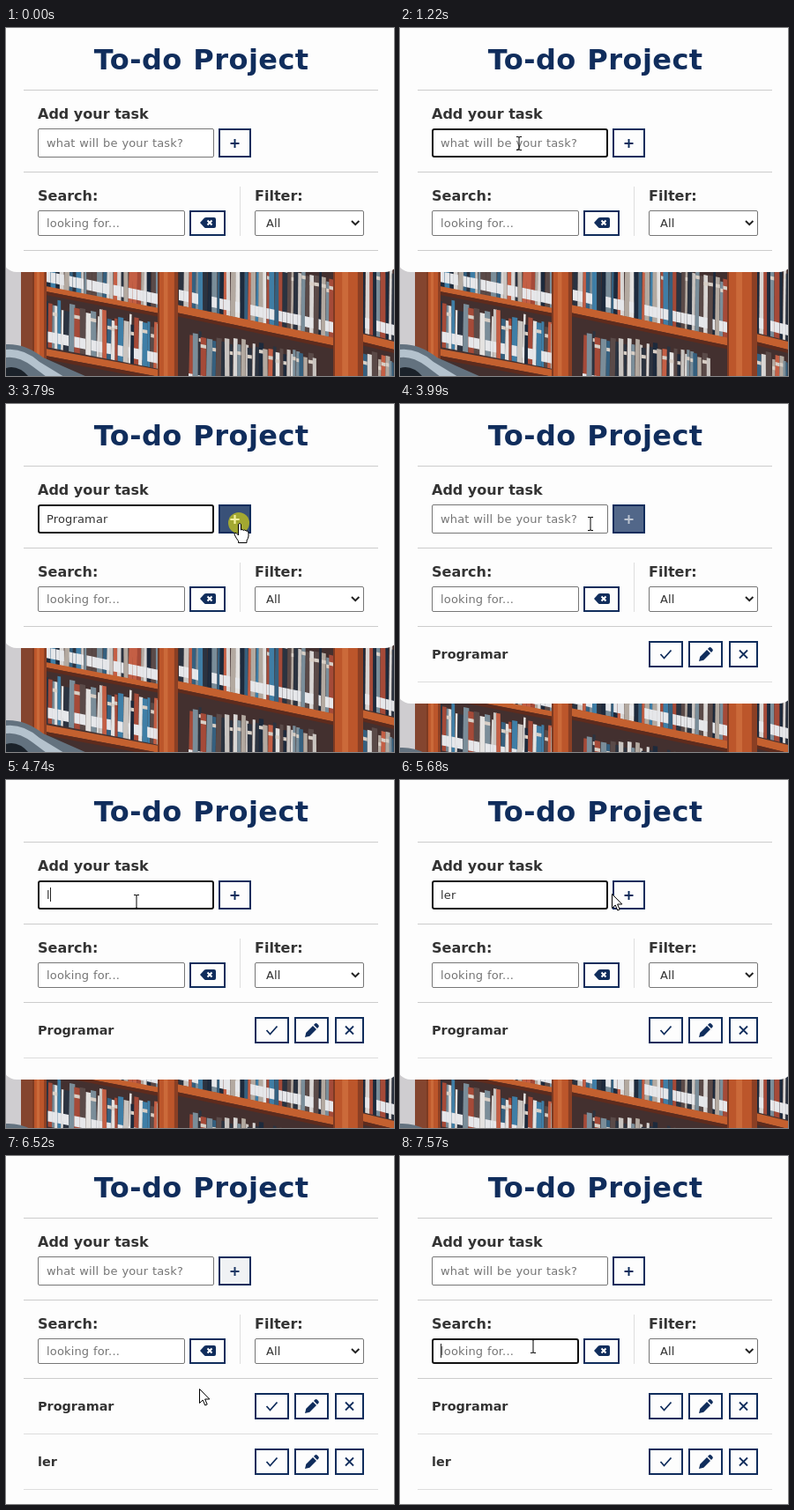
These frames come from a looping animation (440 px wide and 395 px high, 8000 ms). An HTML page:

```html
<!DOCTYPE html>
<html lang="en">
<head>
<meta charset="utf-8">
<title>To-do Project</title>
<style>
html, body { margin: 0; width: 100%; height: 100%; overflow: hidden; background: #fdfdfd; }
svg { display: block; width: 440px; height: 395px; }
text { font-family: Verdana, "DejaVu Sans", sans-serif; font-size: 13px; fill: #333; letter-spacing: .012em; word-spacing: .034em; white-space: pre; }
.title { font-size: 32px; font-weight: bold; fill: #102d5c; text-anchor: middle; letter-spacing: .0135em; }
.label { font-size: 16px; font-weight: bold; letter-spacing: 0; word-spacing: 0; }
.task { font-size: 14.4px; font-weight: bold; letter-spacing: 0; }
.hint { fill: #757575; }
.line { stroke: #ccc; }
.field { fill: #fff; stroke: #767676; }
.focus { stroke: #101010; stroke-width: 2; }
.btn { fill: #fdfdfd; stroke: #102d5c; stroke-width: 2; }
.icon { fill: none; stroke: #102d5c; stroke-width: 2; }
.solid { fill: #102d5c; }
.photo { filter: blur(.5px); }
</style>
</head>
<body>
<svg id="stage" viewBox="0 0 440 395"></svg>
<script>
const LOOP = 8000;
const NAVY = [16, 45, 92], PAPER = [253, 253, 253];
const PLUS = 'M254.5 131H264.5M259.5 126V136';
const stage = document.getElementById('stage');

function add(parent, tag, attrs = {}, text) {
  const el = document.createElementNS('http://www.w3.org/2000/svg', tag);
  for (const k in attrs) el.setAttribute(k, attrs[k]);
  if (text) el.textContent = text;
  parent.append(el);
  return el;
}
const group = (parent, cls = '') => add(parent, 'g', { class: cls });
const poly = (parent, points, fill) => add(parent, 'polygon', { points: points.join(' '), fill });
const path = (parent, d, cls) => add(parent, 'path', { d, class: cls });
const blob = (parent, d, fill) => add(parent, 'path', { d, fill });
const label = (parent, x, y, cls, text) => add(parent, 'text', { x, y, class: cls }, text);
const box = (parent, x, y, w, h, cls, rx = 0) =>
  add(parent, 'rect', { x, y, width: w, height: h, class: cls, rx });
const show = (el, on) => el.setAttribute('display', on ? 'inline' : 'none');

// Bookshelf backdrop
let seed = 11;
const rand = () => (seed = (seed * 16807) % 2147483647) / 2147483647;
const SPINES = ['#2b3340', '#d9d6d4', '#3f7ea6', '#a54a38', '#c9c4c0', '#1d2a3c',
  '#e4e2e0', '#35607f', '#b3a9a0', '#7a8d99', '#5a4a48', '#c45f45'];

// Slanted strip between two x positions, `h` tall
const strip = (g, x0, y0, x1, y1, h, fill) =>
  poly(g, [x0, y0, x1, y1, x1, y1 + h, x0, y0 + h], fill);

function books(g, x0, y0, x1, y1, height, vary) {
  strip(g, x0, y0 - height - 12, x1, y1 - height - 12, height + 12, '#43302f');
  const slope = (y1 - y0) / (x1 - x0);
  for (let x = x0; x < x1;) {
    const w = Math.min(2.5 + rand() * 4, x1 - x), lean = 1.5 - rand() * 2;
    const top = height - rand() * vary;
    const a = y0 + slope * (x - x0), b = a + slope * w;
    const color = SPINES[Math.floor(rand() * SPINES.length)];
    poly(g, [x + lean, a - top, x + w + lean, b - top, x + w, b, x, a], color);
    if (rand() < .75) strip(g, x, a - 18, x + w, b - 18, 12, '#e6e7ea');
    if (rand() < .4) strip(g, x + lean, a - top + 8, x + w + lean, b - top + 8, 4, '#d8cfc6');
    x += w;
  }
}
function plank(g, x0, y0, x1, y1, h) {
  strip(g, x0, y0, x1, y1, h, '#c4602f');
  strip(g, x0, y0 + h, x1, y1 + h, 4, '#5e2b1d');
}
function post(g, x, w) {
  const bar = (left, right, fill) => strip(g, x + left, 200, x + right, 200, 230, fill);
  bar(0, w, '#bc562b');
  bar(0, 2, '#7d3a22');
  bar(w * .3, w * .5, '#cb6a3a');
  bar(w * .82, w, '#8a3f24');
}
function drawPhoto(g) {
  add(g, 'rect', { y: 200, width: 440, height: 230, fill: '#43302f' });
  strip(g, -5, 200, 17, 200, 230, '#cfcdd0');
  strip(g, 17, 200, 30, 200, 230, '#84452f');
  books(g, 45, 362, 174, 387, 56, 12);
  books(g, 45, 294, 174, 320, 60, 14);
  plank(g, 45, 293, 174, 318, 6);
  plank(g, 34, 362, 174, 388, 8);
  books(g, 207, 410, 352, 436, 68, 9);
  books(g, 196, 315, 372, 352, 76, 16);
  plank(g, 193, 314, 374, 352, 9);
  books(g, 404, 425, 440, 434, 62, 10);
  books(g, 404, 346, 440, 355, 88, 16);
  plank(g, 395, 345, 440, 356, 9);
  post(g, 30, 16);
  post(g, 172, 23);
  post(g, 371, 34);
  blob(g, 'M0 359Q22 358 42 374L92 396V430H0Z', '#63727f');
  blob(g, 'M0 365Q20 363 38 379L66 396H46L30 384Q14 372 0 374Z', '#b4c2cd');
  blob(g, 'M0 386Q14 382 26 396V430H0Z', '#1b222a');
}

const photo = group(stage, 'photo');
drawPhoto(photo);
const card = add(stage, 'rect', { x: -4, y: -30, width: 450, rx: 16, fill: '#fdfdfd' });

// Static interface
const rule = (parent, y) => path(parent, `M20 ${y}H422`, 'line');
label(stage, 221.7, 47, 'title', 'To-do Project');
[70.5, 163.5, 252.5].forEach(y => rule(stage, y));
label(stage, 36, 103, 'label', 'Add your task');
label(stage, 36, 196, 'label', 'Search:');
label(stage, 282, 196, 'label', 'Filter:');
path(stage, 'M265.5 180V236', 'line').style.stroke = '#ddd';

function makeField(x, y, w, h, hint, baseline) {
  const f = {};
  f.idle = box(stage, x + .5, y + .5, w - 1, h - 1, 'field', 1.5);
  f.ring = box(stage, x + 1, y + 1, w - 2, h - 2, 'field focus', 2);
  f.hint = label(stage, x + 10, baseline, 'hint', hint);
  f.text = label(stage, x + 10, baseline, '', '');
  f.caret = add(stage, 'rect', { y: baseline - 13, width: 1, height: 16, fill: '#222' });
  return f;
}
const taskField = makeField(36, 114, 200, 33, 'what will be your task?', 135);
const searchField = makeField(36, 207, 167, 29, 'looking for...', 226);

const plusBtn = box(stage, 242, 115, 35, 31, 'btn');
const plusIcon = path(stage, PLUS, 'icon');
box(stage, 209, 208, 39, 27, 'btn');
path(stage, 'M220 221L225 215.5Q226 215 227 215H236Q238 215 238 217V225Q238 227 236 227H227Q226 227 225 226.5Z', 'solid');
path(stage, 'M228.5 218.5l5 5m0-5l-5 5', 'icon').style.stroke = '#fff';

box(stage, 282.5, 207.5, 123, 28, 'field', 1.5);
label(stage, 295, 226, '', 'All');
path(stage, 'M392 219l4.2 4.2 4.2-4.2', 'icon').style.stroke = '#222';

function makeRow(y, name) {
  const g = group(stage);
  label(g, 36, y + 20, 'task', name);
  [[283, 37], [328, 37], [374, 31]].forEach(([x, w]) => box(g, x, y + 1, w, 28, 'btn'));
  path(g, `M295.5 ${y + 15}l4 4.5 8-9`, 'icon').style.strokeWidth = 1.8;
  path(g, `M339 ${y + 23}l1.3-5.3 7.7-7.7 4 4-7.7 7.7zM349 ${y + 9}l1.4-1.4q1.2-1 2.4 0l1.6 1.6q1 1.2 0 2.4l-1.4 1.4z`, 'solid');
  path(g, `M385 ${y + 10.5}l9 9m0-9l-9 9`, 'icon').style.strokeWidth = 1.8;
  rule(g, y + 46.5).style.stroke = '#ddd';
  return g;
}
const rows = [makeRow(269, 'Programar'), makeRow(332, 'ler')];

// Pointer
const halo = add(stage, 'circle', { r: 12, fill: '#dcd70a', opacity: .65 });
const plusOver = path(stage, PLUS, 'icon');
plusOver.style.stroke = '#f3f0a0';
const outline = { fill: '#fff', stroke: '#000', 'stroke-width': 1, 'stroke-linejoin': 'round' };
const pointers = {
  arrow: add(stage, 'path', { ...outline, d: 'M.5 .5V16.5L4.2 13 6.8 19 9.2 18 6.6 12H11.8Z' }),
  hand: add(stage, 'path', { ...outline, d: 'M-.5 1.5Q1-.5 2.5 1.5V8Q4 6.5 5.3 8.500Q7 7 8 9Q10.500 8 11 11V15Q10.500 18 9 20V22.500H-.5V20.500Q-3 17.500-5 13Q-5.500 10.500-3 11.500L-.5 14Z' }),
  beam: add(stage, 'path', { fill: 'none', stroke: '#000', d: 'M-3 -7.5H-1Q0 -7.5 0 -6.5Q0 -7.5 1 -7.5H3M0 -6.5V6.5M-3 7.5H-1Q0 7.5 0 6.5Q0 7.5 1 7.5H3' })
};

// Timeline: [time, x, y]
const ROUTE = [
  [70, 175, 308], [560, 135, 131], [3370, 135, 131], [3720, 264, 135], [3880, 264, 135],
  [4130, 148, 138], [5130, 148, 138], [5680, 240, 129], [5820, 264, 135], [6150, 264, 135],
  [6520, 219, 264], [6730, 206, 282], [7400, 151, 216], [LOOP, 151, 216]
];
const CLICKS = [[620, 690], [3720, 3860], [4200, 4270], [5960, 6030], [7430, 7570]];
const KEYS = [
  [1420, 'P'], [1820, 'Pr'], [1950, 'Pro'], [2080, 'Prog'], [2280, 'Progr'], [2350, 'Progra'],
  [2550, 'Program'], [2620, 'Programa'], [2820, 'Programar'], [3860, ''],
  [4740, 'l'], [4870, 'ler'], [6030, '']
];
const CARET_STARTS = [690, 4270, 7570];
const ADDED = [3860, 6030];
const BLINK = 530;

const within = (t, a, b) => t >= a && t < b;
const smooth = p => { p = Math.min(1, Math.max(0, p)); return p * p * (3 - 2 * p); };
const ramp = (t, a, b) => smooth((t - a) / (b - a));

function pointerAt(t) {
  const i = Math.max(1, ROUTE.findIndex(k => k[0] > t));
  const [t0, x0, y0] = ROUTE[i - 1], [t1, x1, y1] = ROUTE[i];
  const p = ramp(t, t0, t1);
  return [x0 + (x1 - x0) * p, y0 + (y1 - y0) * p];
}
function pointerKind(x, y) {
  const over = (l, t, r, b) => x >= l && x <= r && y >= t && y <= b;
  if (over(36, 114, 236, 147) || over(36, 207, 203, 236)) return 'beam';
  return over(241, 114, 278, 147) || over(208, 207, 249, 236) ? 'hand' : 'arrow';
}
const mix = (a, b, p) => `rgb(${a.map((v, i) => Math.round(v + (b[i] - v) * p))})`;

function setField(f, focused, value, caretOn) {
  show(f.idle, !focused);
  show(f.ring, focused);
  show(f.hint, !value);
  if (f.text.textContent !== value) f.text.textContent = value;
  show(f.caret, focused && caretOn);
  f.caret.setAttribute('x', Math.round(46 + (value ? f.text.getComputedTextLength() : 0)));
}

function render(t) {
  const count = ADDED.filter(a => t >= a).length;
  rows.forEach((row, i) => show(row, i < count));
  card.setAttribute('height', [307, 370, 450][count]);
  photo.setAttribute('transform', `translate(0 ${31 * count})`);

  const typed = KEYS.filter(k => t >= k[0]).pop();
  const value = typed ? typed[1] : '';
  const resets = [...CARET_STARTS, ...KEYS.map(k => k[0])].filter(s => t >= s);
  const caretOn = Math.floor((t - Math.max(0, ...resets)) / BLINK) % 2 === 0;
  setField(taskField, within(t, 620, ADDED[0]) || within(t, 4200, ADDED[1]), value, caretOn);
  setField(searchField, t >= 7430, '', caretOn);

  const hover = ramp(t, 3600, 3860) - ramp(t, 3890, 4180) + ramp(t, 5700, 5950) - ramp(t, 6220, 6570);
  plusBtn.style.fill = mix(PAPER, NAVY, hover);
  plusIcon.style.stroke = mix(NAVY, PAPER, hover);

  const [x, y] = pointerAt(t);
  const visible = t >= 70 && !within(t, 1420, 3370);
  const kind = pointerKind(x, y);
  const snap = `translate(${Math.round(x)} ${Math.round(y)})`;
  for (const k in pointers) {
    show(pointers[k], visible && k === kind);
    pointers[k].setAttribute('transform', snap);
  }
  const clicking = CLICKS.some(([a, b]) => within(t, a, b));
  show(halo, clicking);
  show(plusOver, clicking && kind === 'hand');
  halo.setAttribute('transform', snap);
}

function tick(now) {
  render(now % LOOP);
  requestAnimationFrame(tick);
}
render(0);
requestAnimationFrame(tick);
</script>
</body>
</html>
```
